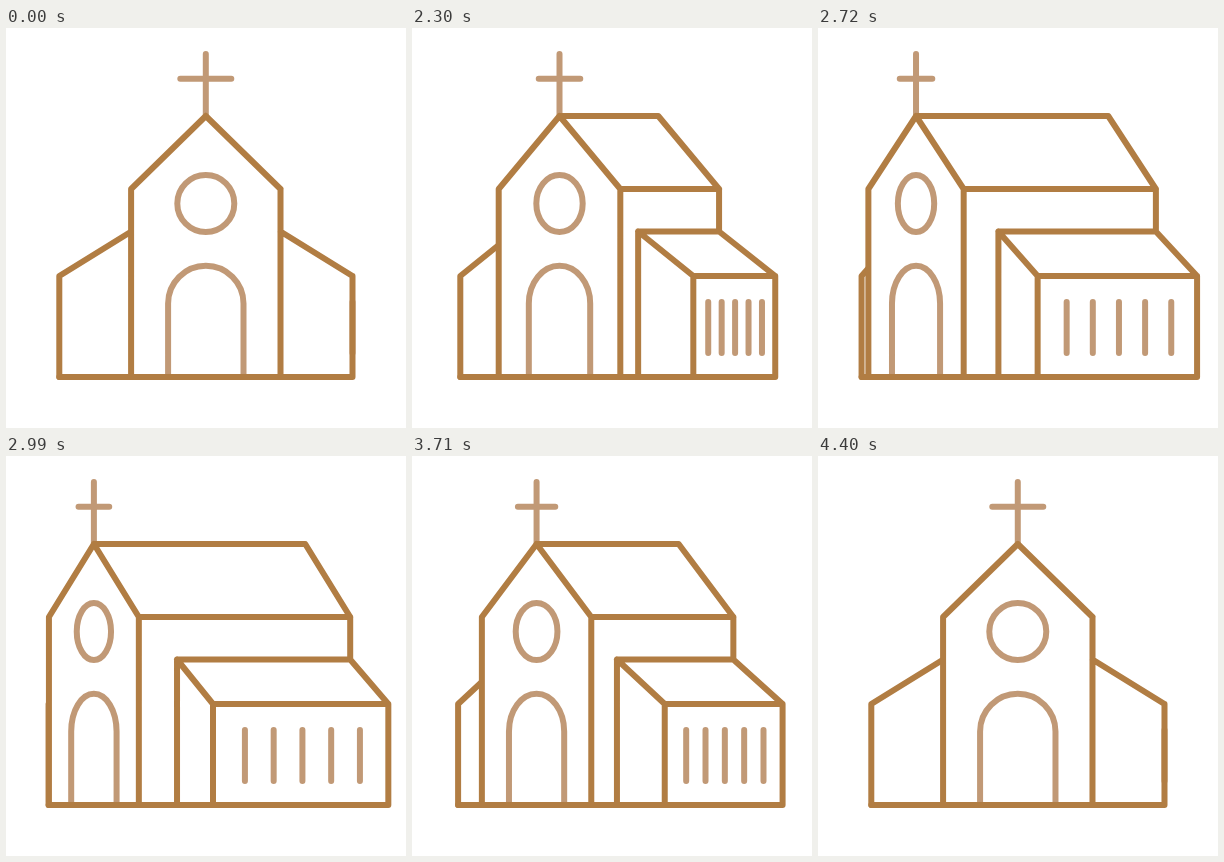
Recreate the animation shown at these times as an HTML page. Size 400 by 400 pixels, loop 4430 ms.

```html
<!DOCTYPE html>
<html lang="en">
<head>
<meta charset="utf-8">
<title>Church</title>
<style>
html, body { margin: 0; height: 100%; overflow: hidden; background: #fff; }
svg { display: block; width: 100vw; height: 100vh; }
path { fill: none; stroke-width: 6; stroke-linecap: round; stroke-linejoin: round; }
.dark { stroke: #b17d43; }
.light { stroke: #c19976; }
#face { fill: #fff; }
</style>
</head>
<body>
<svg viewBox="0 0 400 400">
  <path id="leftAisle" class="dark"/>
  <path id="face"/>
  <path id="details" class="light"/>
  <path id="walls" class="dark"/>
</svg>
<script>
const LOOP = 4430, START = 2000, TURN = 3210, END = 4415, STEP = 30, FIRST = 2030;
const RIDGE = 88, EAVE = 161, AISLE_TOP = 203.5, AISLE_EAVE = 248, BASE = 349;
const byId = id => document.getElementById(id);
const draw = (id, d) => byId(id).setAttribute('d', d);
const line = (...points) => 'M' + points.map(p => p.join(' ')).join('L');

// Cubic easing with control points (a, 0) and (b, 1)
function ease(x, a, b) {
  x = Math.min(1, Math.max(0, x));
  let lo = 0, hi = 1;
  for (let i = 0; i < 30; i++) {
    const s = (lo + hi) / 2, r = 1 - s;
    if (3 * a * s * r * r + 3 * b * s * s * r + s * s * s < x) lo = s; else hi = s;
  }
  return lo * lo * (3 - 2 * lo);
}

// 0 = seen from the front, 1 = fully turned
function turnAt(t) {
  if (t < FIRST) return 0;
  t = FIRST + Math.floor((t - FIRST) / STEP) * STEP;
  return t < TURN
    ? ease((t - START) / (TURN - START), .2, .18)
    : 1 - ease((t - TURN) / (END - TURN), .561, .396);
}

function render(turn) {
  const at = (from, change) => from + change * turn;
  const mid = at(199.8, -114), half = at(74.7, -30.3), k = half / 74.7;
  const left = mid - half, right = mid + half;
  const backRidge = at(199.8, 101.3), backEave = backRidge + half;
  const inner = at(274.5, -105.4), corner = at(346.5, -142.1), back = at(346.5, 36.5);
  const outer = at(53.3, -10.9);

  draw('leftAisle', line([outer + corner - inner, AISLE_TOP], [outer, AISLE_EAVE], [outer, BASE], [left, BASE]));
  draw('face', line([left, BASE], [left, EAVE], [mid, RIDGE], [right, EAVE], [right, BASE]) + 'Z');

  const arm = 25.5 * k, rx = 28.5 * k, door = 37.7 * k;
  let details = line([mid, 26], [mid, RIDGE]) + line([mid - arm, 50.7], [mid + arm, 50.7]) +
    `M${mid - rx} 175.5a${rx} 28.5 0 1 1 ${2 * rx} 0a${rx} 28.5 0 1 1 ${-2 * rx} 0` +
    `M${mid - door} ${BASE}V275.5a${door} 37.7 0 0 1 ${2 * door} 0V${BASE}`;
  for (let i = 0; i < 5; i++) {
    const x = corner + (back - corner) * (.182 + .164 * i);
    details += line([x, 274], [x, 325]);
  }
  draw('details', details);

  draw('walls',
    line([left, BASE], [left, EAVE], [mid, RIDGE], [right, EAVE], [right, BASE]) +
    line([mid, RIDGE], [backRidge, RIDGE], [backEave, EAVE], [right, EAVE]) +
    line([backEave, EAVE], [backEave, AISLE_TOP], [back, AISLE_EAVE], [back, BASE], [outer, BASE]) +
    line([backEave, AISLE_TOP], [inner, AISLE_TOP], [inner, BASE]) +
    line([inner, AISLE_TOP], [corner, AISLE_EAVE], [corner, BASE]) +
    line([corner, AISLE_EAVE], [back, AISLE_EAVE]));
}

const begin = performance.now();
function tick() {
  render(turnAt((performance.now() - begin) % LOOP));
  requestAnimationFrame(tick);
}
tick();
</script>
</body>
</html>
```
